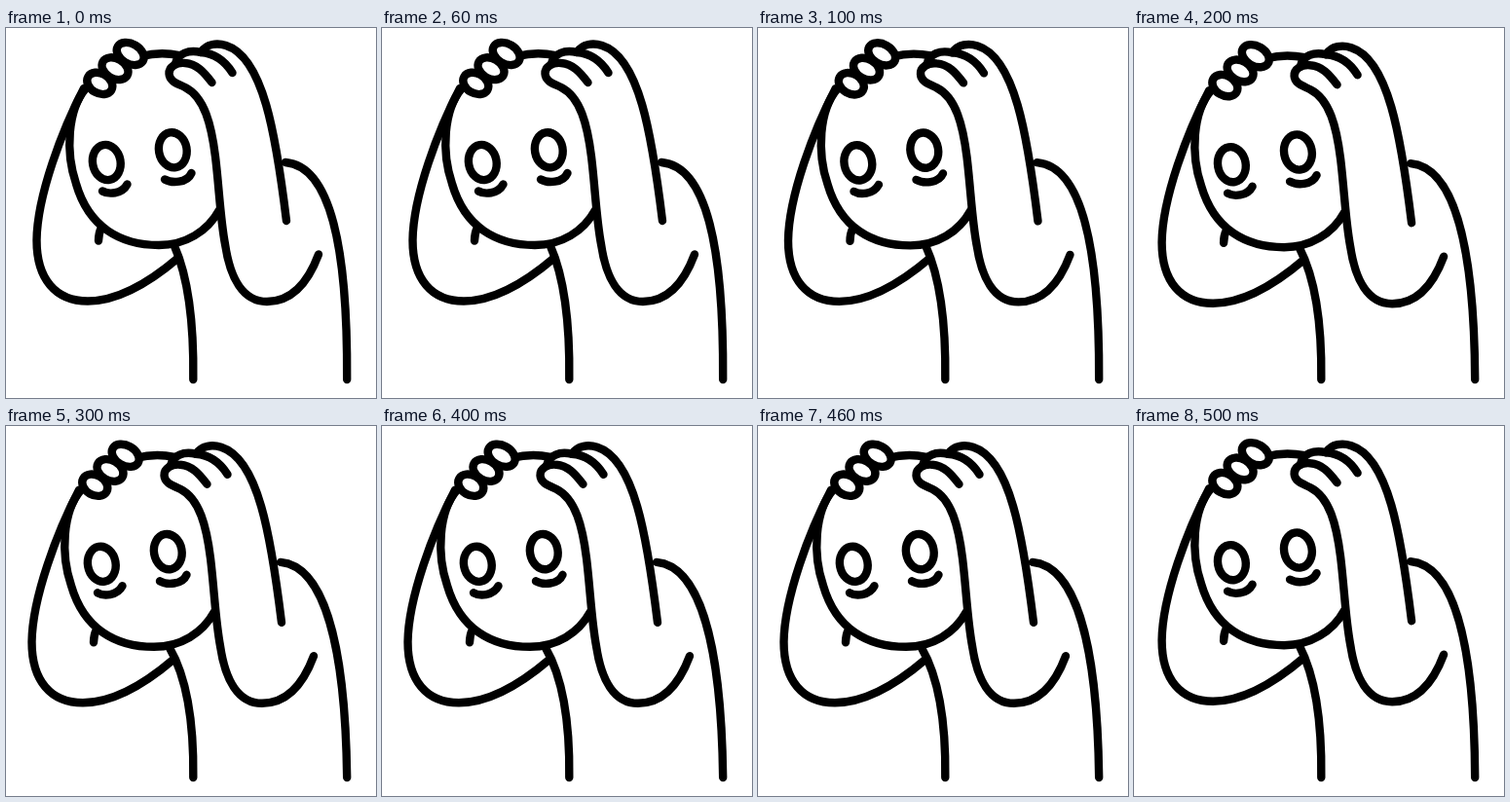
Write an HTML page with a canvas that moves like this. It is 380 px wide and 380 px high and loops after 600 ms.

```html
<!DOCTYPE html>
<html lang="en">
<head>
<meta charset="utf-8">
<title>Head in hands</title>
<style>
html, body { margin: 0; width: 100%; height: 100%; overflow: hidden; background: #fff; }
canvas { display: block; width: 380px; height: 380px; }
</style>
</head>
<body>
<canvas id="stage"></canvas>
<script>
const SIZE = 380, STEP = 100, LINE = 8.4;
const canvas = document.getElementById('stage');
const ctx = canvas.getContext('2d');
const ratio = window.devicePixelRatio || 1;
canvas.width = canvas.height = SIZE * ratio;

// How far the head and arms have sunk, held for one step each
const sway = [0, 0.1, 0.58, 1, 1, 0.58];
const REACH = { x: -5, y: 3.8 };

const lines = [
  // head
  'M139 29 Q158 24 178 28',
  'M82 62 C63 84 61 128 72 160 C85 205 118 223 157 223 C184 223 207 209 219 187',
  // far arm
  'M80 62 C58 104 32 172 31.5 218 C31.5 258 51 280.5 84 280.5 C117 280.5 150 259 177 236',
  // near arm and fingers
  'M211.5 56 C203 45 196 37 184 36 C175 35 167 40 167.5 47 C168 55 176 57 184 61 C204 71 211 100 215 132 C219 165 220 195 225 222 C230 256 243 281 268 281 C294 281 310 262 321 232.5',
  'M174 37 C176 26 188 22 200 25 C214 26 225 34 232.5 46',
  'M200 25 C206 16 217 15 226 18 C264 30 277 108 288 198',
  // bags under the eyes
  'M99 167.5 C105 171 119 171 124.5 160.5',
  'M163 155.5 C170 159.5 186 159.5 190.5 149',
  // chin crease
  'M98 205 Q95 211 95 218.5'
].map(d => new Path2D(d));

function ellipse(x, y, rx, ry, deg) {
  ctx.beginPath();
  ctx.ellipse(x, y, rx, ry, deg * Math.PI / 180, 0, Math.PI * 2);
  ctx.fill();
  ctx.stroke();
}

// The waist stays put while the shoulders follow the head
function drawBody(dx, dy) {
  ctx.beginPath();
  ctx.moveTo(173 + dx, 224 + dy);
  ctx.bezierCurveTo(188 + dx / 2, 258, 193, 305, 192.3, 361);
  ctx.moveTo(287 + dx, 138 + dy / 2);
  ctx.bezierCurveTo(334 + dx * 1.3, 142 + dy / 2, 351 + dx / 2, 228, 350.2, 361);
  ctx.stroke();
}

function draw(amount) {
  const dx = REACH.x * amount, dy = REACH.y * amount;
  ctx.setTransform(ratio, 0, 0, ratio, 0, 0);
  ctx.fillStyle = '#fff';
  ctx.fillRect(0, 0, SIZE, SIZE);
  ctx.strokeStyle = '#000';
  ctx.lineWidth = LINE;
  ctx.lineCap = ctx.lineJoin = 'round';

  drawBody(dx, dy);
  ctx.translate(dx, dy);
  lines.forEach(path => ctx.stroke(path));
  ellipse(103.3, 138, 14.3, 18.2, -10);
  ellipse(171.3, 125.3, 14.3, 18.2, -10);
  for (let i = 0; i < 3; i++) ellipse(127.7 - 15.7 * i, 26.5 + 15.2 * i, 15 - 0.6 * i, 10.2, 30);
}

function tick(now) {
  draw(sway[Math.floor(now / STEP) % sway.length]);
  requestAnimationFrame(tick);
}
draw(sway[0]);
requestAnimationFrame(tick);
</script>
</body>
</html>
```
